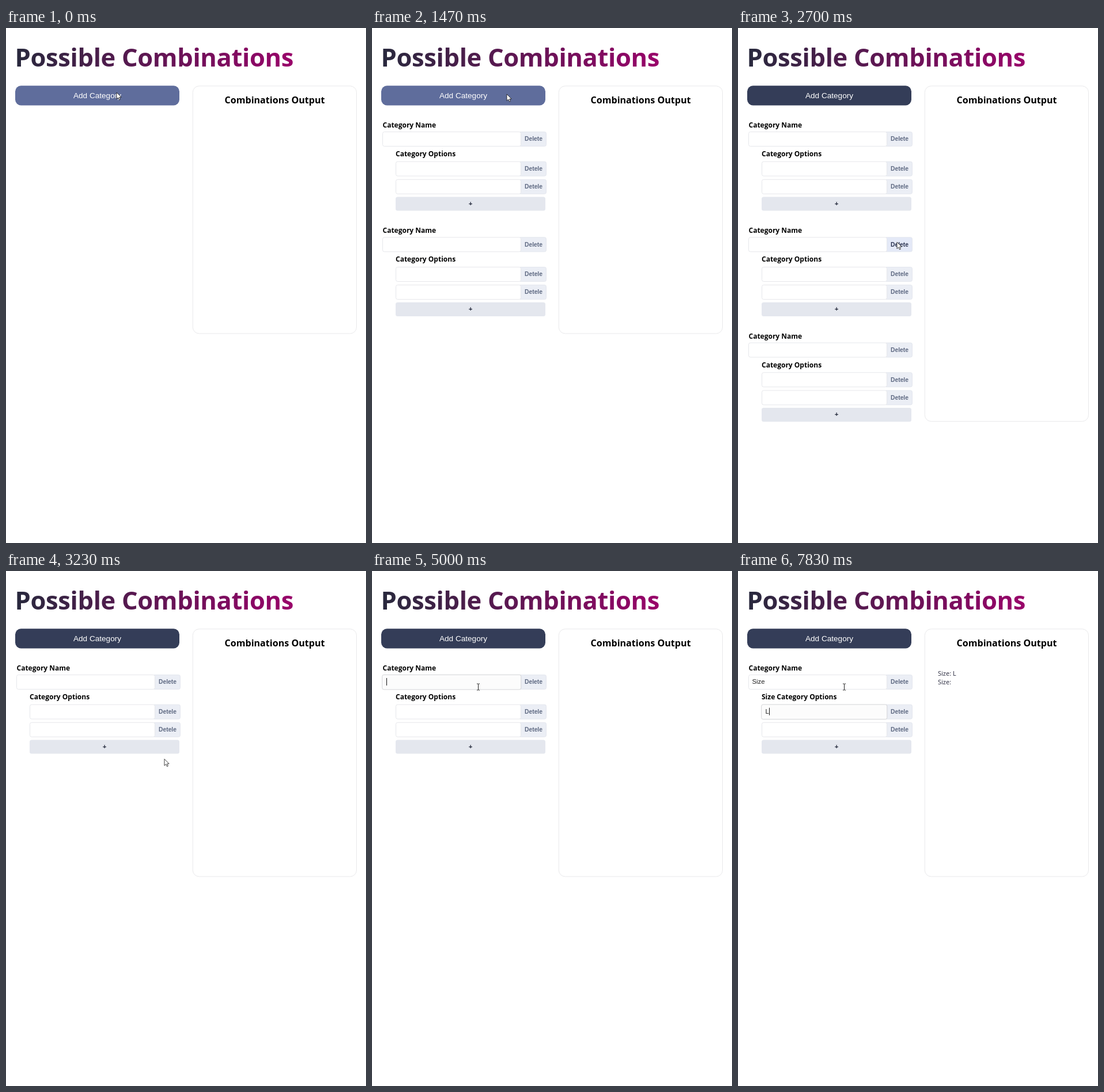
These frames come from a looping animation (625x895 px, 8 s). An HTML page:

```html
<!DOCTYPE html>
<html lang="en">
<head>
<meta charset="utf-8">
<title>Possible Combinations</title>
<style>
  html, body { margin: 0; width: 100%; height: 100%; overflow: hidden; background: #fff; }
  svg { display: block; width: 625px; height: 895px; }
  text { font-family: "Liberation Sans", Arial, sans-serif; white-space: pre; }
  .title, .heading, .label, .result { font-family: "Open Sans", "Noto Sans", sans-serif; }
  .title { font-size: 43.5px; font-weight: 700; letter-spacing: -.35px; fill: url(#ink); }
  .heading { font-size: 16.1px; font-weight: 700; text-anchor: middle; }
  .label { font-size: 12px; font-weight: 700; }
  .result { font-size: 11px; fill: #28293d; }
  .add { font-size: 13.6px; fill: #fff; text-anchor: middle; }
  .small { font-size: 10.3px; font-weight: 700; fill: #5d6881; text-anchor: middle; }
  .active { fill: #2b3350; }
  .plus { font-size: 11.5px; font-weight: 700; fill: #22283a; text-anchor: middle; }
  .value { font-size: 11.3px; fill: #222; }
</style>
</head>
<body>
<svg viewBox="0 0 625 895">
  <defs>
    <linearGradient id="ink" gradientUnits="userSpaceOnUse" x1="16" x2="497" y1="0" y2="0">
      <stop stop-color="#28293d"/><stop offset="1" stop-color="#99036a"/>
    </linearGradient>
  </defs>
  <text class="title" x="15.5" y="67">Possible Combinations</text>
  <g id="app"></g>
</svg>
<script>
const LOOP = 8000, PITCH = 183.3;
const app = document.getElementById('app');
const ruler = document.createElement('canvas').getContext('2d');
ruler.font = '11.3px "Liberation Sans", Arial, sans-serif';

// Pointer path: time, x, y
const PATH = [
  [0, 192, 112], [70, 192, 112], [400, 196, 116], [870, 212, 186], [930, 212, 190],
  [1000, 214, 194], [1330, 234, 115], [1470, 234, 115], [1570, 236, 113], [2070, 236, 113],
  [2680, 276, 372], [3100, 276, 372], [3500, 272, 192], [3700, 272, 192],
  [3830, 236, 213], [3960, 184.5, 201.5], [LOOP, 184.5, 201.5]
];
const ADDED = [270, 1470, 1930], DELETED = [2770, 3100];
const NAME_KEYS = [5630, 5800, 6070, 6500], OPTION_KEYS = [7830];
const NAME_FOCUS = 3940, DELETE_FOCUS = 6870, OPTION_FOCUS = 7470;
const CARET_RESETS = [NAME_FOCUS, ...NAME_KEYS, OPTION_FOCUS, ...OPTION_KEYS];

const passed = (times, t) => times.filter(time => time <= t).length;
const ramp = (t, start) => Math.min(1, Math.max(0, (t - start) / 150));
const mix = (a, b, k) => `rgb(${a.map((v, i) => Math.round(v + (b[i] - v) * k))})`;
const text = (cls, x, y, str) => `<text class="${cls}" x="${x}" y="${y}">${str}</text>`;
const box = (x, y, w, h, r, fill, stroke = 'none') =>
  `<rect x="${x}" y="${y}" width="${w}" height="${h}" rx="${r}" fill="${fill}" stroke="${stroke}"/>`;

function pointerAt(t) {
  const i = PATH.findIndex(p => p[0] > t);
  const [t0, x0, y0] = PATH[i - 1], [t1, x1, y1] = PATH[i];
  let k = (t - t0) / (t1 - t0);
  k *= k * (3 - 2 * k);
  return { x: x0 + (x1 - x0) * k, y: y0 + (y1 - y0) * k };
}

function drawPointer({ x, y }, overText) {
  const shape = overText
    ? '<path d="M-2.5-5.5H-.7L0-5 .7-5.5H2.5M0-5V5M-2.5 5.5H-.7L0 5 .7 5.5H2.5" fill="none" stroke="#222"/>'
    : '<path d="M0 0V11.5L2.7 9 4.5 13 6.4 12.2 4.6 8.3H8.2Z" fill="#fff" stroke="#111" stroke-width=".8"/>';
  return `<g transform="translate(${x} ${y})">${shape}</g>`;
}

function render(t) {
  const pointer = pointerAt(t);
  const count = passed(ADDED, t) - passed(DELETED, t);
  const name = 'Size'.slice(0, passed(NAME_KEYS, t));
  const option = 'L'.slice(0, passed(OPTION_KEYS, t));
  const lastReset = CARET_RESETS[passed(CARET_RESETS, t) - 1];
  const caretOn = (t - lastReset) % 1060 < 530;
  let overText = false;

  function field(x, y, caption, value = '', focused = false, buttonFocused = false) {
    const inside = pointer.y >= y && pointer.y <= y + 25.5;
    const active = buttonFocused || inside && pointer.x > 258 && pointer.x < 303;
    overText ||= inside && pointer.x >= x && pointer.x <= 258;
    let out = box(254.5, y + .5, 48, 25, 3, active ? '#e4e9f7' : '#ebeef5', '#e4e7ee')
      + text(active ? 'small active' : 'small', 280.5, y + 16.3, caption);
    out += focused
      ? box(x - .3, y + .3, 240.8 - x + 18.3, 25.7, 3, '#fcfcfc', '#d3d4d7')
      : box(x + .5, y + .5, 258 - x, 25, 3, '#fff', '#e6e7eb');
    out += text('value', x + 6.5, y + 16.3, value);
    if (focused && caretOn) {
      const caretX = Math.round(x + 6.5 + ruler.measureText(value).width);
      out += box(caretX, y + 6, 1, 13, 0, '#111');
    }
    return out;
  }

  function category(i) {
    const y = i * PITCH, first = i === 0;
    const prefix = first && name ? name + ' ' : '';
    return text('label', 18.5, y + 173, 'Category Name')
      + field(18, y + 180, 'Delete', first ? name : '',
          first && t >= NAME_FOCUS && t < DELETE_FOCUS,
          first && t >= DELETE_FOCUS && t < OPTION_FOCUS)
      + text('label', 41, y + 223, prefix + 'Category Options')
      + field(41, y + 231.7, 'Detele', first ? option : '', first && t >= OPTION_FOCUS)
      + field(41, y + 262.8, 'Detele')
      + box(41, y + 293.4, 260, 24.2, 3.5, '#e4e7ee')
      + text('plus', 171, y + 308.7, '+');
  }

  const glow = 1 - ramp(t, 550) + ramp(t, 1180) - ramp(t, 2150);
  let out = box(16, 100.3, 285, 34.2, 10, mix([52, 61, 88], [95, 109, 156], glow))
    + text('add', 158.5, 122, 'Add Category')
    + box(324.3, 100.8, 284.2, count === 3 ? 582.8 : 430.2, 11, '#fff', '#e9e9eb')
    + text('heading', 466.5, 131, 'Combinations Output');
  if (name) {
    out += text('result', 347, 182, `${name}: ${option}`) + text('result', 347, 197, `${name}:`);
  }
  for (let i = 0; i < count; i++) out += category(i);
  app.innerHTML = out + drawPointer(pointer, overText);
}

function tick() {
  render(performance.now() % LOOP);
  requestAnimationFrame(tick);
}
tick();
</script>
</body>
</html>
```
